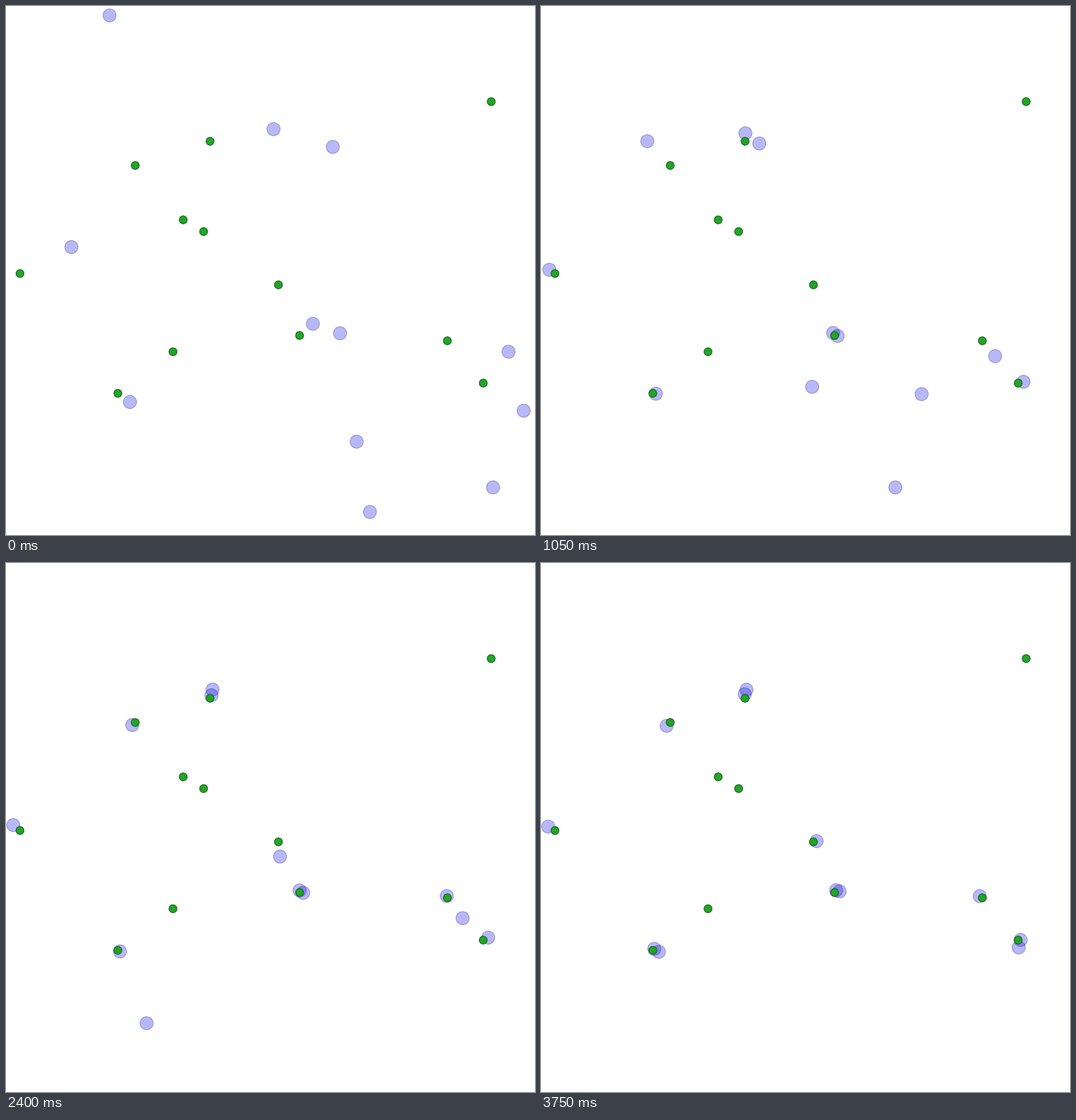
Write a matplotlib script that moves like this. It is 700 by 700 pixels and loops after 3900 ms.

```python
import numpy as np
import matplotlib.pyplot as plt
from matplotlib.animation import FuncAnimation
from matplotlib.collections import EllipseCollection

SIZE, DPI = 700, 100
FRAMES, INTERVAL = 26, 150
PIXEL = 72 / DPI
SWAY = 2.5

FOOD = [(642, 126.5), (270, 179), (171, 211), (234.5, 283), (261.5, 298.5),
        (18.5, 354), (360.5, 369), (388.5, 436), (584, 443), (221, 457.5),
        (148, 512.5), (631.5, 499)]

# Key points (step, x, y) of each agent: start, turns, resting place.
ROUTES = [
    # straight to the nearest food
    [(0, 354, 163), (5, 271, 170)],
    [(0, 86.5, 319), (7, 11, 349)],
    [(0, 406, 420.5), (5, 388, 431)],
    [(0, 442, 433), (5, 394, 435)],
    [(0, 665, 457.5), (5, 637, 498)],
    [(0, 164, 524), (5, 152, 512)],
    # longer ways round
    [(0, 137, 12.5), (5, 136.5, 127), (9, 147, 219), (13, 165, 216)],
    [(0, 432.5, 186.5), (5, 322.5, 189.5), (9, 272, 176)],
    [(0, 685, 535.5), (5, 619.5, 488.5), (9, 588, 443), (13, 583, 443)],
    [(0, 464, 576.5), (5, 396.5, 529), (9, 333, 478.5), (13, 373.5, 436.5),
     (18, 353.5, 364.5), (22, 364, 366)],
    [(0, 481.5, 669.5), (5, 481.5, 554.5), (9, 533.5, 479), (13, 600.5, 440),
     (18, 603.5, 494.5), (22, 630, 510)],
    [(0, 644.5, 637), (5, 530, 637), (9, 403, 637), (14, 236, 636),
     (18, 155, 576.5), (21, 163, 537), (25, 156, 514.5)],
]

rng = np.random.default_rng(4)


def travel(route):
    """Cubic path through the key points that comes to rest at the last."""
    t, p = np.array(route)[:, 0], np.array(route)[:, 1:]
    slope = np.gradient(p, t, axis=0)
    slope[0] *= 0.8  # agents start out a little slower
    slope[-1] = 0

    now = np.minimum(np.arange(FRAMES), t[-1])
    i = np.clip(np.searchsorted(t, now, side="right") - 1, 0, len(t) - 2)
    h = (t[i + 1] - t[i])[:, None]
    u = (now - t[i])[:, None] / h
    return ((1 + 2 * u) * (1 - u) ** 2 * p[i] + u * (1 - u) ** 2 * h * slope[i]
            + u ** 2 * (3 - 2 * u) * p[i + 1]
            + u ** 2 * (u - 1) * h * slope[i + 1])


def sway(arrival):
    """Slow drifting around the food, fading in after the arrival."""
    step = np.arange(FRAMES)[:, None]
    rate = rng.uniform(0.4, 0.9, 2)
    phase = rng.uniform(0, 2 * np.pi, 2)
    fade = np.clip((step - arrival) / 3, 0, 1)
    return SWAY * fade * np.sin(rate * step + phase)


def add_dots(ax, centers, diameter, face, edge, zorder):
    n = len(centers)
    dots = EllipseCollection(
        [diameter] * n, [diameter] * n, [0] * n, units="xy",
        offsets=centers, offset_transform=ax.transData,
        facecolors=[face], edgecolors=[edge], linewidths=PIXEL, zorder=zorder)
    ax.add_collection(dots)
    return dots


tracks = np.stack([travel(r) + sway(r[-1][0]) for r in ROUTES], axis=1)

fig = plt.figure(figsize=(SIZE / DPI, SIZE / DPI), dpi=DPI, facecolor="white")
ax = fig.add_axes([0, 0, 1, 1])
ax.set_xlim(0, SIZE)
ax.set_ylim(SIZE, 0)
ax.axis("off")

agents = add_dots(ax, tracks[0], 17.4, (0, 0, 0.92, 0.28), (0, 0, 0.3, 0.3), 1)
add_dots(ax, FOOD, 10.4, "#22a528", "#125f16", 2)


def update(step):
    agents.set_offsets(tracks[step])
    return (agents,)


anim = FuncAnimation(fig, update, frames=FRAMES, interval=INTERVAL,
                     repeat=True, repeat_delay=0)
plt.show()
```
